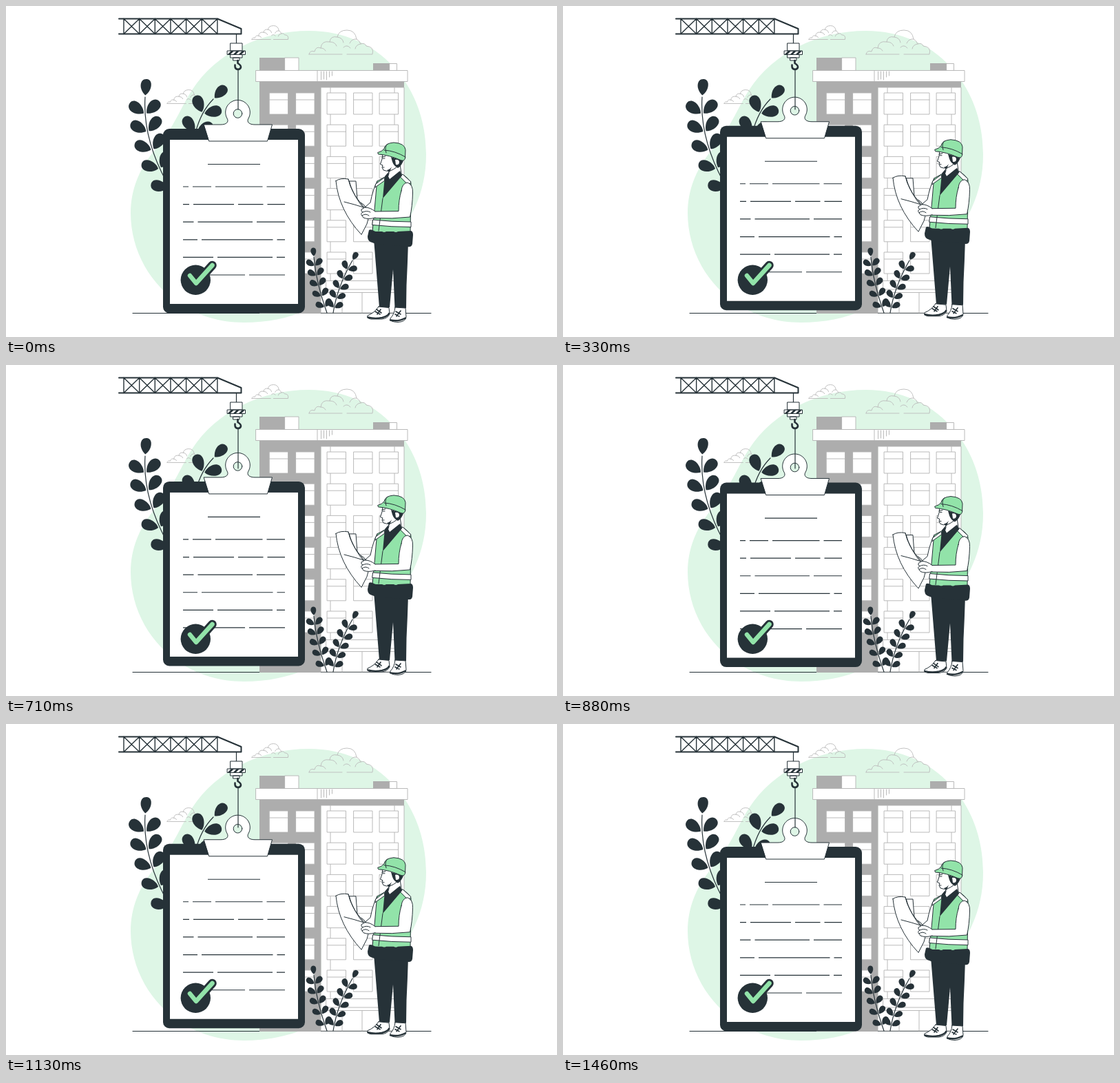
Recreate the animation shown at these times as an HTML page. Size 800 by 480 pixels, loop 1500 ms.

```html
<!DOCTYPE html>
<html lang="en">
<head>
<meta charset="utf-8">
<title>Construction checklist</title>
<style>
  html, body { margin: 0; width: 100%; height: 100%; overflow: hidden; background: #fff; }
  svg { display: block; width: 100%; height: 100%; }
  path, rect, circle { stroke-linecap: round; stroke-linejoin: round; }
  .dark { fill: #263238; }
  .ink { fill: none; stroke: #263238; }
  .shape { fill: #fff; stroke: #263238; }
  .green { fill: #92e3a9; stroke: #263238; }
  .gray { fill: #adadad; }
  .wall { fill: #fff; stroke: #b3b3b3; stroke-width: .9; }
  .thin { fill: none; stroke: #b3b3b3; stroke-width: .9; }
  #cloud { fill: none; stroke: #bcbcbc; stroke-width: .9; vector-effect: non-scaling-stroke; }
</style>
</head>
<body>
<svg viewBox="0 0 800 480">
  <defs>
    <path id="cloud" d="M0 0H48M55 0H92Q95-11 83-12Q81-17 75-15Q73-20 69-22Q67-35 55-35Q43-35 41-25Q31-27 30-18Q18-20 17-9Q10-12 8-4Q1-6 0 0M41-25Q49-24 50-17M30-18Q38-18 40-12M69-22Q62-23 59-16M75-15Q68-14 67-8M17-9Q22-9 24-5M50-10Q55-15 60-9"/>
  </defs>
  <path fill="#def6e6" d="M440 36C540 36 610 115 610 215C610 290 570 340 520 385C470 430 420 459 345 459C250 459 181 385 181 300C181 262 197 232 215 210C245 175 252 150 270 122C305 68 370 36 440 36Z"/>
  <use href="#cloud" transform="translate(440 70)"/>
  <use href="#cloud" transform="translate(357 48.5) scale(.57)"/>
  <use href="#cloud" transform="translate(234 141.5) scale(.57)"/>

  <path class="ink" d="M184 445.5H617" stroke-width="1.1"/>

  <g id="building">
    <path class="gray" d="M368 75H405V94H368ZM533 83H557V94H533ZM368 109H578V118H457V446H368Z"/>
    <path class="wall" d="M405 75H425V94H405ZM557 83.5H567.5V94H557ZM457.5 118H578V445H457.500Z"/>
    <path class="wall" d="M363 93.5H583V109.5H363ZM452 93.5V109.5"/>
    <path class="thin" d="M457.5 95V107M461.5 95V106M465.5 95V107M469.5 95V103M473.5 95V101M471 118V398M564 118V398M465 398.5H570V411H465ZM458 415.5H578M488 415.5V445M517 415.5V445"/>
  </g>

  <g id="plants"></g>

  <g id="board">
    <rect class="dark" x="228" y="178" width="206" height="267.5" rx="9"/>
    <rect x="238" y="194" width="186" height="238" fill="#fff"/>
    <path class="ink" id="lines" stroke-width="1.2" style="stroke-linecap:butt"/>
    <path class="shape" d="M287.5 172H312C320 172 324 168 321 163A17.8 17.8 0 1 1 352 163C349 168 353 172 361 172H386.5L379.5 196H295Z"/>
    <circle cx="336.5" cy="156" r="6.3" fill="#def6e6" stroke="#263238"/>
  </g>

  <g id="tick" fill="none">
    <circle class="dark" cx="275.3" cy="397.3" r="21.7"/>
    <path stroke="#263238" d="M267 391L276 402L299.5 376" stroke-width="12.5"/>
    <path stroke="#92e3a9" d="M267 391L276 402L299.5 376" stroke-width="6.5"/>
  </g>

  <g id="crane">
    <path class="ink" id="truss" stroke-width="1.4"/>
    <path class="ink" d="M164 18.5H307L341.5 33V40.5H164" stroke-width="2"/>
    <path class="ink" d="M334.5 41V54M337 92V150" stroke-width="1.2"/>
    <path class="shape" d="M326 54H343V65H326ZM321.5 65H347.5V70.5H321.5ZM326 70.5H343V75H326ZM330 75H339V79H330Z"/>
    <path class="dark" d="M322 70L327 65H331L326 70ZM330 70L335 65H339L334 70ZM338 70L343 65H347L342 70Z"/>
    <path class="ink" d="M336.5 79V83Q341.5 86 341 89A4.4 4.4 0 0 1 332.5 88V85.5" stroke-width="2.6"/>
  </g>

  <g id="worker">
    <path class="shape" d="M499 254L508 254L510 280L516 294H503Z"/>
    <path class="shape" d="M539 254Q533 265 529 285L522 291L528 300L538 297Z"/>
    <path class="shape" d="M479 253.500Q486 249 497 251Q501 270 516 287L528 301L524 316L516 331.500Q483 296 479 253.500Z"/>
    <path class="ink" d="M491 284Q507 288 519 292M497 251Q505 278 521 295"/>

    <path class="dark" d="M534 338L584 342Q583 375 581.5 405L581 438H564.5L562 382L557 437H542Z"/>
    <path class="shape" d="M541 436L556 437.5L557 447Q554 453 546 454H530Q523 453 525 449Q535 445 541 436Z"/>
    <path class="shape" d="M565 437L580 438L581 451Q580 458 569 458.5Q556 458 558 453Q564 447 565 437Z"/>
    <path class="ink" d="M525.5 451.5Q535 454 546 452Q554 450 556 446M558 455.5Q570 458 580 452.5" stroke-width="2.4"/>
    <path class="ink" d="M538 440L545 445M536 443L543 447M544 440L539 447M566 443L573 447M565 447L571 450M573 442L567 450" stroke-width="1.6"/>

    <path class="green" d="M539 254L550 248L573 243Q585 249 588 257L587 329Q560 331 532 327L535 296Z"/>
    <path class="shape" d="M537 258L549 249L550 253L536 263ZM572 247L576 244L588 255L585 260Z"/>
    <path class="shape" d="M533 310Q560 313 588 313V320.5Q560 320.5 532 317.5Z"/>
    <path class="ink" d="M547 279L541 326"/>
    <path class="shape" d="M555 232L556 243L551 257L574 243L572 229Z"/>
    <path class="dark" d="M556 240L550 247L547 279L575 246L572 239L557 251L555 247Z"/>
    <path class="shape" d="M574 268Q575 257 583 256Q591 259 590.5 271Q590 291 586.5 306Q560 309 535 307.5L533 298L570 297.5Q570 281 574 268Z"/>
    <path class="shape" d="M536 298Q529 292 521 292L516 295Q515 298 518 299Q514 301 517 304L519 307Q526 310 536 307"/>
    <path class="ink" d="M518 299Q524 296 529 299M517 304Q522 300 527 304M515 285Q521 288 522 292"/>
    <path class="dark" d="M527 325Q530 323 536 327H546Q549 329 552 327H563Q566 329 569 327L588 326Q591 327 591 332L590 345Q589 350 583 349L537 345L529 342Q525 340 525 334Z"/>

    <path class="shape" d="M547 214L546 222L543.5 229.5L547 231L546 234L548 238Q552 240 558 239Q568 235 574 226L573 218Z"/>
    <path class="dark" d="M559 219L577 224Q575 231 569 235Q563 232 561 226ZM553 238Q558 237 560 233L557 241Z"/>
    <path fill="#fff" d="M565 223Q571 222 571 227Q570 231 566 230Z"/>
    <path class="ink" d="M547 221H550M546 219L551 218M547 234H549"/>
    <path class="green" d="M540 212.500Q546 211 549 207Q550 199 563 198Q579 199 580 208.500L579.500 221Q578 225.500 573 223.500Q556 216 541 215Z"/>
    <path class="ink" d="M549 209Q565 210 580 219M554 200Q549 204 552 213"/>
  </g>
</svg>
<script>
  const find = id => document.getElementById(id);
  const range = n => [...Array(n).keys()];

  function leaf([x, y], angle, length) {
    const dx = Math.cos(angle) * length, dy = Math.sin(angle) * length;
    const at = (along, side) => `${x + dx * along - dy * side} ${y + dy * along + dx * side}`;
    return `<path class="dark" d="M${at(.1, 0)}C${at(.3, .32)} ${at(.95, .44)} ${at(1, .05)}` +
           `C${at(1.03, -.36)} ${at(.45, -.42)} ${at(.1, 0)}Z"/>`;
  }

  // A curved stem with leaf pairs at even steps and one leaf at the tip.
  function plant(root, bend, tip, pairs, length, first = 0) {
    const point = t => root.map((r, k) =>
      (1 - t) ** 2 * r + 2 * t * (1 - t) * bend[k] + t * t * tip[k]);
    const heading = t => {
      const [dx, dy] = root.map((r, k) => (1 - t) * (bend[k] - r) + t * (tip[k] - bend[k]));
      return Math.atan2(dy, dx);
    };
    const leaves = range(pairs).flatMap(i => {
      const t = (i + first) / (pairs + first);
      return [-.87, .87].map(spread => leaf(point(t), heading(t) + spread, length));
    });
    return `<path class="ink" stroke-width="1.2" d="M${root}Q${bend} ${tip}"/>` +
           leaves.join('') + leaf(tip, heading(1), length * .93);
  }
  find('plants').innerHTML =
    plant([238, 264], [198, 195], [202, 132], 5, 28) +
    plant([275, 184], [283, 153], [301, 135], 2, 28) +
    plant([466, 445], [450, 400], [447, 364], 5, 14.5, .5) +
    plant([475, 445], [481, 407], [503, 369], 5, 14.5, .5);

  const windows = range(6).flatMap(row => [382.5, 421, 466.5, 505, 542.5].map(x =>
    `<path class="wall" d="M${x} ${126 + row * 46.2}h27v31h-27zm0 10h27"/>`));
  find('building').innerHTML += windows.join('');

  find('truss').setAttribute('d', range(6).map(i => {
    const left = 171 + i * 22.65, right = left + 22.65;
    return `M${left} 18.5V40.5L${right} 18.5V40.5L${left} 18.5`;
  }).join(''));

  // Each row of writing is one line broken by word gaps.
  const gaps = [[268, 301, 375.5], [269, 334, 376.5], [275.5, 361], [281, 390.5], [304, 390], [350]];
  find('lines').setAttribute('d', 'M293 229.5H369' + gaps.map((row, i) => {
    const y = 262 + i * 25.6;
    return `M257 ${y}` + row.map(x => `H${x - 3}M${x + 3} ${y}`).join('') + 'H405';
  }).join(''));

  // Linear rise and fall at 24 steps per second.
  const LOOP = 1500, STEPS = 36, RISE = 9.6;
  const start = performance.now();
  function draw(now) {
    const time = Math.max(0, now - start) % LOOP;
    const step = Math.min(STEPS - 1, Math.floor((time + 5) * STEPS / LOOP));
    const lift = 1 - Math.abs(2 * (step + .5) / STEPS - 1);
    for (const id of ['board', 'worker'])
      find(id).setAttribute('transform', `translate(0 ${.27 - RISE * lift})`);
    requestAnimationFrame(draw);
  }
  draw(start);
</script>
</body>
</html>
```
